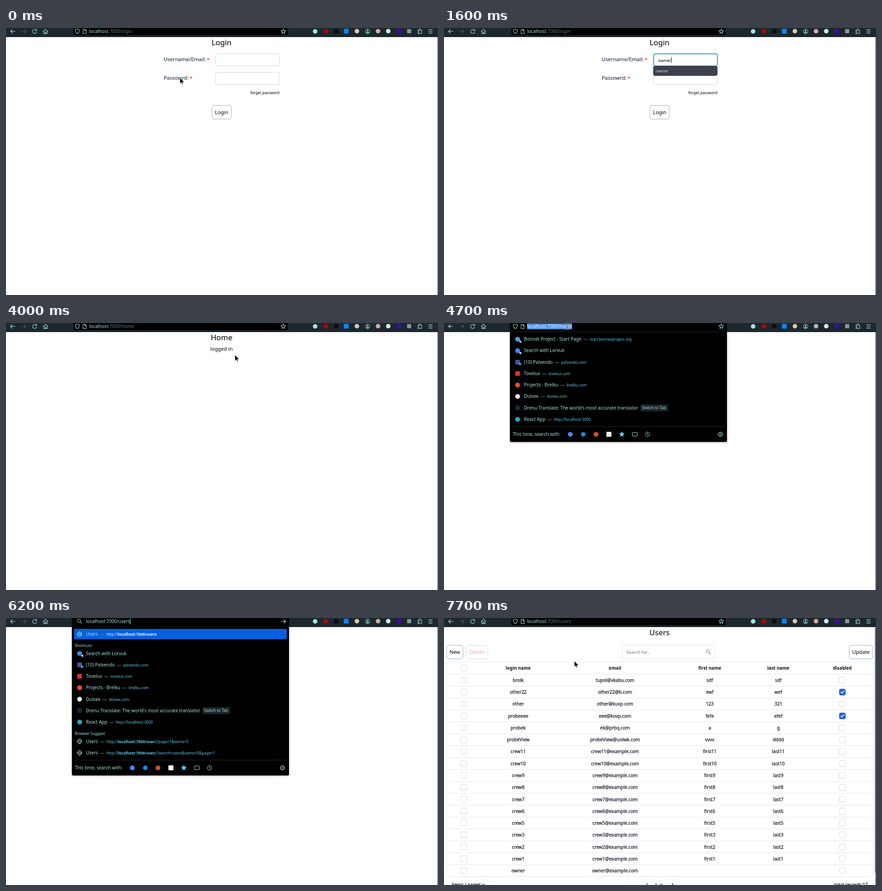
These frames come from a looping animation (951x589 px, 8 s). An HTML page:

```html
<!DOCTYPE html>
<html lang="en">
<head>
<meta charset="utf-8">
<title>Login walkthrough</title>
<style>
  html, body { margin: 0; width: 100%; height: 100%; overflow: hidden; background: #fff; }
  svg { display: block; width: 951px; height: 589px; font-family: "Noto Sans", sans-serif; }
  text { white-space: pre; }
  .panel { filter: drop-shadow(0 1px 3px #0003); }
</style>
</head>
<body>
<svg id="stage" viewBox="0 0 951 589"></svg>
<script>
const LOOP = 8000;
const TEAL = '#a3e6df', DIM = '#557a7a', CYAN = '#5ccdf0', LINE = '#e2e5ea', BORDER = '#cdd3df';
const stage = document.getElementById('stage');

// Drawing helpers
const rect = (x, y, w, h, fill, rx = 0, stroke = 'none', sw = 1) =>
  `<rect x="${x}" y="${y}" width="${w}" height="${h}" fill="${fill}" rx="${rx}" stroke="${stroke}" stroke-width="${sw}"/>`;
const disc = (x, y, r, fill, stroke = 'none') =>
  `<circle cx="${x}" cy="${y}" r="${r}" fill="${fill}" stroke="${stroke}"/>`;
const square = (x, y, size, fill) => rect(x - size / 2, y - size / 2, size, size, fill, 1);
const text = (x, y, s, size, fill = '#000', anchor = 'start', extra = '') =>
  `<text x="${x}" y="${y}" font-size="${size}" fill="${fill}" text-anchor="${anchor}" ${extra}>${s}</text>`;
const mid = (x, y, s, size, fill, extra) => text(x, y, s, size, fill, 'middle', extra);
// Medium weight: regular glyphs with a hairline outline
const medium = (x, y, s, size, fill, anchor) => text(x, y, s, size, fill, anchor, `stroke="${fill}" stroke-width="0.25"`);
const icon = (x, y, d, stroke = TEAL, fill = 'none', sw = 1.1) =>
  `<path transform="translate(${x} ${y})" d="${d}" stroke="${stroke}" fill="${fill}" stroke-width="${sw}" stroke-linecap="round" stroke-linejoin="round"/>`;
const caret = (x, y, color = '#000') => rect(x, y, 1, 13, color);

const starPath = r => Array.from({ length: 10 }, (_, i) => {
  const a = i * Math.PI / 5, k = i % 2 ? r * 0.45 : r;
  return `${i ? 'L' : 'M'}${(k * Math.sin(a)).toFixed(2)} ${(-k * Math.cos(a)).toFixed(2)}`;
}).join('') + 'Z';
const ARROW = 'M-5 0H5M1 -4L5 0L1 4';
const CHEVRON = 'M-3 -1.5L0 1.5L3 -1.5';
const lens = (x, y, color, k = 1) => icon(x, y, `M${1.8 * k} ${1.8 * k}L${5 * k} ${5 * k}`, color) + disc(x - k, y - k, 3.6 * k, 'none', color);
const globe = (x, y) => disc(x, y, 5, 'none', TEAL) + icon(x, y, 'M-5 0H5M0 -5C-3 -2 -3 2 0 5C3 2 3 -2 0 -5', TEAL, 'none', 0.9);

function toolbar() {
  return rect(0, 0, 951, 20, '#1c282e') + rect(0, 19, 951, 1, '#10191d') +
    icon(15, 7.5, 'M5 0H-5M-1 -4L-5 0L-1 4') + icon(39, 7.5, ARROW, '#4c5c60') +
    icon(63, 7.5, 'M3.6 -2.8A4.5 4.5 0 1 0 4.5 1M4.4 -5V-1.8H1.2') +
    icon(87, 7.5, 'M-5 0L0 -4.8L5 0M-3.8 -1V5H3.8V-1M-1.2 5V1.5H1.2V5') +
    disc(680.5, 7.5, 5, TEAL) + disc(704, 7, 5.3, '#a5060d') + square(727, 7, 10, '#0b1114') +
    square(749, 7, 10.5, '#0d86f0') + disc(772.5, 7, 5, '#d9c9b2') +
    disc(796, 7.5, 5, 'none', TEAL) + disc(796, 6, 1.7, TEAL) + icon(796, 7.5, 'M-2.8 2.8Q0 .6 2.8 2.8Z', TEAL, TEAL) +
    disc(819, 7, 5, '#c9b1a4') + disc(841.5, 7, 5, '#d5e9e8') + disc(865, 7, 5.2, '#4309b5') + square(887.5, 7, 9, '#8997a0') +
    icon(911, 7.5, 'M-4.3 -2.6H-1.5V-4A1.4 1.4 0 0 1 1.3 -4V-2.6H4V4.8H-4.3V2.8H-3A1.4 1.4 0 0 0 -3 0H-4.3Z') +
    icon(934.5, 7.5, 'M-4 -3.6H4M-4 0H4M-4 3.6H4');
}

function addressText(t, path) {
  const host = 'localhost', port = ':7000/';
  if (t >= 5800 && t < 6400) {
    const typed = 'users'.slice(0, Math.floor((t - 5800) / 100) + 1);
    const ends = [253, 258, 263.5, 267.8, 273];
    return lens(161.5, 7, TEAL) + text(176, 11, host + port + typed, 10, TEAL) +
      caret(ends[typed.length - 1], 1, TEAL) + icon(610.5, 7.5, ARROW);
  }
  const selected = t >= 4600 && t < 5800;
  const from = t < 4900 ? 183 : 254;
  return icon(157, 7.5, 'M0 -5L4.5 -3.5C4.5 1 3 3.8 0 5C-3 3.8 -4.5 1 -4.5 -3.5Z') +
    icon(173, 7.5, 'M-3.3 -4.7H.7L3.5 -1.9V4.7H-3.3ZM.7 -4.7V-1.9H3.5') +
    icon(610.5, 7.5, starPath(5.5)) +
    (selected ? rect(from, 1, 282 - from, 13, '#4a8fdc') : '') +
    (selected
      ? text(183, 11, `<tspan fill="${t < 4900 ? '#fff' : TEAL}">${host + port}</tspan>${path}`, 10, '#fff')
      : text(183, 11, `${host}<tspan fill="${DIM}">${port + path}</tspan>`, 10, TEAL));
}

// Suggestion list
const SHORTCUTS = [
  ['Bonnet Project - Start Page', 'start.bonnetproject.org', '#51a2da', disc, 'pin'],
  ['Search with Lorvuk', '', '#4285f4', disc, 'pin'],
  ['(10) Palvendo', 'palvendo.com', '#3b5c9f', square, 'star'],
  ['Tovelux', 'tovelux.com', '#e62f2f', square],
  ['Projects · Brelku', 'brelku.com', '#e5532d', disc],
  ['Dulvex', 'dulvex.com', '#e4e6e8', disc],
  ["Drenu Translate: The world's most accurate translator", '', '#17263f', square, 'tab'],
  ['React App', 'http://localhost:3000', '#2ba9bd', disc],
];

const entry = (y, title, url, urlColor = CYAN) => text(176, y + 3.5, title + (url
  ? `<tspan dx="4.5" fill="#73a5a5">—</tspan><tspan dx="4" font-size="8.4" fill="${urlColor}">${url}</tspan>` : ''), 10, TEAL);

function shortcut([title, url, color, shape, badge], y) {
  return shape(162, y, shape === disc ? 5.3 : 10, color) + entry(y, title, url) +
    (badge === 'pin' ? icon(166, y + 3, 'M0 0L4 1L2.8 2.2L4.5 4.5L3.8 5L2 3L1 4Z', '#fff', '#fff', 0.6) : '') +
    (badge === 'star' ? icon(167.5, y + 4.5, starPath(3), CYAN, CYAN, 0.5) : '') +
    (badge === 'tab' ? rect(432.5, y - 7.5, 61, 15, '#1d282c', 2) + text(436, y + 3.2, 'Switch to Tab', 8.5, TEAL) : '');
}

function footer(y) {
  return rect(151, Math.floor(y - 17), 466, 1, '#20272a') + text(151.5, y + 3.5, 'This time, search with:', 10, TEAL) +
    disc(278, y, 5.3, '#4285f4') + disc(306.5, y, 5, '#168be0') + disc(334.5, y, 5.3, '#d94b36') + square(363, y, 11, '#f4f4f4') +
    icon(391.5, y, starPath(5.5), CYAN, CYAN) + rect(414.5, y - 4, 11, 8, 'none', 1.5, TEAL) +
    disc(448, y, 5, 'none', TEAL) + icon(448, y, 'M0 -3V0L2 1.2') +
    disc(608.5, y, 4.2, 'none', TEAL) + disc(608.5, y, 1.6, 'none', TEAL) +
    `<circle cx="608.5" cy="${y}" r="5" fill="none" stroke="${TEAL}" stroke-width="1.2" stroke-dasharray="1.8 2.13"/>`;
}

function dropdown(t) {
  const typing = t >= 5800, bottom = typing ? 347.5 : 262.5;
  let out = `<g class="panel">${rect(145, -6, 478, bottom + 6, '#000', 3)}</g>`;
  if (!typing) {
    out += rect(151, 19, 466, 1, '#20272a');
    SHORTCUTS.forEach((s, i) => out += shortcut(s, 35.7 + i * 25.25));
    return out + footer(245.5);
  }
  const bold = s => `http://<tspan font-weight="700">localhost:7000/${s}</tspan>`;
  out += rect(150, 24, 468, 22.7, '#0560dd', 2) + globe(162, 35.7) + entry(35.7, 'Users', bold('users'), '#e4f7f6') +
    text(151.5, 64, 'Shortcuts', 8.4, TEAL) + text(151.5, 257.5, 'Browser Suggest', 8.4, TEAL);
  SHORTCUTS.slice(1).forEach((s, i) => out += shortcut(s, 78 + i * 25.25));
  ['s?page=1&amp;items=5', 's?search=users&amp;items=5&amp;page=1'].forEach((query, i) => {
    const y = 272.2 + i * 25.3;
    out += globe(162, y) + entry(y, 'Users', bold('user') + query);
  });
  return out + footer(330.5);
}

// Pages
const button = (x, w, y, h, label, border = '#bcc5d4', color = '#000') =>
  rect(x, y, w, h, '#fff', 4, border, 1.4) + mid(x + w / 2, y + h / 2 + 4, label, 11.2, color);
const field = (y, focused) =>
  rect(461.5, y, 140.5, 27, '#fff', 4, focused ? '#169bd8' : BORDER, focused ? 1.8 : 1);
const label = (y, s, starX) =>
  medium(347, y, s, 11.5, '#374151') + medium(starX, y + 1, '*', 11.5, '#ef4444');

function loginPage(t) {
  const first = t >= 400 && t < 1900, second = t >= 1900;
  const count = Math.max(0, Math.min(5, Math.floor((t - 1100) / 100)));
  const dots = t < 2300 ? 0 : t < 2700 ? Math.min(3, Math.floor((t - 2200) / 100)) : Math.min(5, Math.floor((t - 2300) / 100));
  const caretX = [471, 477, 484.7, 490.8, 496.3, 500.3][count];
  let out = mid(474.5, 38, 'Login', 16.8) + label(73, 'Username/Email:', 442) + label(114, 'Passowrd:', 404) +
    field(56.8, first) + field(98, second) + text(602, 145.5, 'forget password', 8.4, '#000', 'end') +
    button(453.5, 42.5, 170.8, 30.2, 'Login') +
    text(471, 74.5, 'owner'.slice(0, count), 9.8) + text(471, 115.5, '•'.repeat(dots), 9.8);
  if (first) out += caret(caretX, 64);
  if (second) out += caret(471 + dots * 3.72, 105.5);
  if (first && count) {
    const items = ['owner', 'other', 'other22', 'orbit', 'olive'].slice(0, count === 1 ? 5 : 1);
    out += rect(461, 84, 140.5, 3 + items.length * 18, '#3e414d', 4, '#2c2e38');
    items.forEach((s, i) => out += text(466, 98 + i * 18, s, 9.5, '#d2d3da'));
  }
  return out;
}

const homePage = () => mid(474.5, 38, 'Home', 16.8) + mid(474.5, 61, 'logged in', 11.2);

const COLUMNS = [163.3, 376.5, 585, 736];
const RECORDS = [
  ['brolk', 'tupol@vkabu.com', 'sdf', 'sdf'],
  ['other22', 'other22@b.com', 'ewf', 'wef', true],
  ['other', 'other@kuvp.com', '123', '321'],
  ['probeeee', 'eee@kovp.com', 'fefe', 'efef', true],
  ['probek', 'ek@prbq.com', 'a', 'g'],
  ['probeView', 'probeView@uolwk.com', 'vvvv', 'dddd'],
  ...[11, 10, 9, 8, 7, 6, 5, 3, 2, 1].map(n => ['crew' + n, `crew${n}@example.com`, 'first' + n, 'last' + n]),
  ['owner', 'owner@example.com', '', ''],
];
const checkbox = (x, y, on) =>
  rect(x - 6.7, y - 6.7, 13.4, 13.4, on ? '#2060e8' : '#fff', 3.2, on ? '#2060e8' : '#d3d7de') +
  (on ? icon(x, y, 'M-3.2 .2L-1 2.5L3.4 -2.4', '#fff', 'none', 1.7) : '');

function usersPage(t) {
  let out = mid(474.5, 38, 'Users', 16.8) + button(5.7, 36.3, 60.5, 29.7, 'New') +
    button(48.8, 47.7, 60.5, 29.7, 'Delete', LINE, '#f3aaa8') + button(892, 51.7, 60.5, 29.7, 'Update') +
    rect(392.5, 60, 203.5, 29.5, '#fff', 4, LINE) + text(401, 78.7, 'Search for...', 9.8, '#6b7280') + lens(582, 75, '#6b7280', 0.95) +
    rect(5.5, 96.8, 939, 473.8, '#fff', 4, LINE) + checkbox(43.8, 110) + rect(6, 123, 938, 1, LINE);
  ['login name', 'email', 'first name', 'last name', 'disabled'].forEach((s, i) =>
    out += mid([...COLUMNS, 877][i], 114, s, 9.8, '#111', 'font-weight="700"'));
  if (t >= 6500) RECORDS.forEach((record, i) => {
    const y = 137.2 + i * 26.26;
    out += checkbox(43.8, y) + checkbox(877, y, record[4]);
    if (i) out += rect(6, y - 13.6, 938, 1, LINE);
    COLUMNS.forEach((x, c) => out += medium(x, y + 3.7, record[c], 10, '#111827', 'middle'));
  });
  return out + rect(72.5, 577.5, 26, 22, 'none', 4, '#f0f1f4') + medium(17, 591.5, 'items / page:', 10, '#111827') +
    text(76, 591.5, '5', 9.8) + icon(86.5, 588, CHEVRON, '#444') +
    rect(435.5, 576.5, 23, 22, 'none', 4, '#eceef2') + rect(491.5, 576.5, 23, 22, 'none', 4, '#eceef2') +
    icon(447, 588, 'M1.2 -2.5L-1.2 0L1.2 2.5', '#222') + icon(503, 588, 'M-1.2 -2.5L1.2 0L-1.2 2.5', '#222') +
    text(464, 591.5, '1', 9.8) + icon(478, 588, CHEVRON, '#444') +
    medium(933, 591.5, 'total records:17', 10, '#111827', 'end') +
    rect(948.4, 21, 1.2, 541, '#6f7478');
}

// Pointer path: time, x, y
const PATH = [[0, 383, 110], [400, 504, 70.5], [4000, 504, 70.5], [4500, 271, 8], [7000, 271, 8],
  [7400, 284.5, 79], [7500, 284.5, 79], [7700, 287, 95]];

function pointer(t) {
  if ((t >= 1200 && t < 4000) || (t >= 5800 && t < 7100)) return '';
  const next = PATH.findIndex(p => p[0] > t);
  const a = PATH[next < 0 ? PATH.length - 1 : next - 1], b = next < 0 ? a : PATH[next];
  const k = a === b ? 0 : (t - a[0]) / (b[0] - a[0]);
  const x = a[1] + (b[1] - a[1]) * k, y = a[2] + (b[2] - a[2]) * k;
  if (y < 16 || (t < 1200 && x > 461 && y < 84)) {
    const beam = 'M-2 -5.5H2M0 -5.5V5.5M-2 5.5H2';
    return icon(x, y, beam, '#fff', 'none', 2.4) + icon(x, y, beam, '#000', 'none', 1);
  }
  return icon(x, y, 'M0 0V13L3 10.2L5 14.6L7 13.7L5.2 9.6H9.2Z', '#fff', '#000', 0.7);
}

function scene(t) {
  const page = t < 3200 ? 'login' : t < 6400 ? 'home' : 'users';
  const open = t >= 4600 && t < 6300;
  return rect(0, 0, 951, 589, '#fff') + { login: loginPage, home: homePage, users: usersPage }[page](t) +
    rect(950, 20, 1, 569, '#27343a') + toolbar() +
    (open ? dropdown(t) : rect(148.5, -6, 471.5, 22, '#000', 3)) +
    addressText(t, page) + pointer(t);
}

let last = -1;
function tick() {
  const t = Math.floor(performance.now() % LOOP / 100) * 100;
  if (t !== last) stage.innerHTML = scene(last = t);
  requestAnimationFrame(tick);
}
tick();
</script>
</body>
</html>
```
